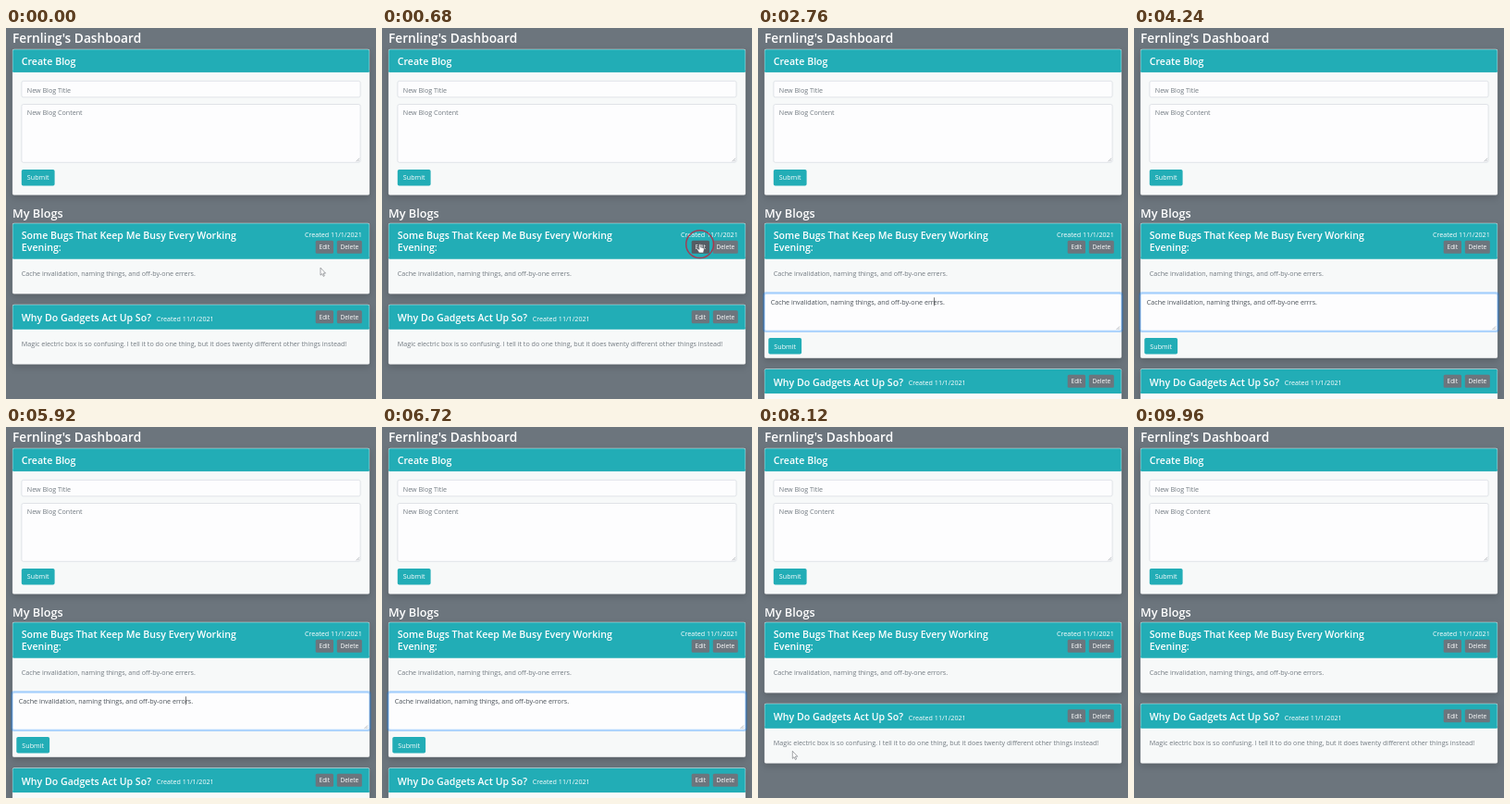
Recreate the animation shown at these times as an HTML page. Size 400 by 401 pixels, loop 10000 ms.

```html
<!DOCTYPE html>
<html lang="en">
<head>
<meta charset="utf-8">
<title>Blog dashboard</title>
<style>
  html, body { margin: 0; height: 100%; overflow: hidden; background: #6c757d; }
  svg { display: block; width: 100vw; height: 100vh; }
  text { font: 7.15px "Open Sans", "Noto Sans", sans-serif; white-space: pre; }
  .h1, .h2, .h3 { font-weight: 600; fill: #fff; }
  .h1 { font-size: 13.7px; }
  .h2 { font-size: 12.7px; }
  .h3 { font-size: 10.6px; }
  .small { font-size: 6.5px; }
  .light { fill: #fff; }
  .muted { fill: #727a81; }
  .typed { fill: #495057; }
  .shadow { filter: drop-shadow(0 3.7px 3.7px rgba(0, 0, 0, .17)); }
</style>
</head>
<body>
<svg id="stage" viewBox="0 0 400 401"></svg>
<script>
const LOOP = 10000;
const TEAL = '#22adb6', GREY = '#6c757d', DARK = '#555c63';
const stage = document.getElementById('stage');
const pen = document.createElement('canvas').getContext('2d');

// Times of the interface events, in ms
const OPEN = 760, FOCUS = 2240, ERASE = 3600, TYPE = 4840, BLUR = 7520, SAVE = 7880;
const BLINK = 530;
const BEFORE = 'Cache invalidation, naming things, and off-by-one err';
const sentence = letter => BEFORE + letter + 'rs.';

// Pointer stops: time, x, y of the hot spot
const trips = [
  [[0, 340, 259.2], [200, 340, 259.2], [560, 343.8, 233.5], [1260, 343.8, 233.5], [1480, 285, 291]],
  [[7300, 78, 328], [7440, 37.3, 350.3], [8480, 37.3, 350.3], [8880, 44, 402]],
];
const clicks = [[600, 343.6, 233.7], [2200, 191, 296], [7480, 37.5, 351]];

const text = (x, y, str, cls, extra = '') =>
  `<text x="${x}" y="${y}" class="${cls}" ${extra}>${str}</text>`;

const box = (x, y, w, h, fill, extra = '') =>
  `<rect x="${x}" y="${y}" width="${w}" height="${h}" fill="${fill}" ${extra}/>`;

// Bordered panel with a teal header
const card = (y, h, head) =>
  box(6.9, y, 386.2, h, '#d9dadb', 'rx="1.9" class="shadow"') +
  box(7.3, y + .4, 385.4, h - .8, '#f7f9f9', 'rx="1.5"') +
  box(7.3, y + .4, 385.4, head - .4, TEAL, 'rx="1.5"') +
  box(7.3, y + head - 2, 385.4, 2, TEAL);

const grip = (x, y) =>
  `<path d="M${x - 4.5} ${y - 1}l3.5 -3.5M${x - 2.5} ${y - 1}l1.5 -1.5" stroke="#8b9095" stroke-width=".6"/>`;

const field = (x, y, w, h, focused) =>
  (focused ? box(x - 1, y - 1, w + 2, h + 2, 'none', 'rx="2.4" stroke="#007bff" stroke-opacity=".3" stroke-width="1.8"') : '') +
  box(x, y, w, h, '#fdfdfe', `rx="1.8" stroke="${focused ? '#80bdff' : '#ced4da'}" stroke-width=".6"`);

const submit = (x, y, fill = TEAL, glow = false) =>
  (glow ? box(x - .8, y - .8, 37.4, 19.2, 'none', 'rx="2.4" stroke="#6fc7cd" stroke-width="1.6"') : '') +
  box(x, y, 35.8, 17.6, fill, 'rx="1.8"') +
  text(x + 17.9, y + 11.5, 'Submit', 'light', 'text-anchor="middle"');

const actions = (y, editFill = GREY) =>
  box(334.7, y, 19.3, 14, editFill, 'rx="1.5"') + text(344.3, y + 9.3, 'Edit', 'light small', 'text-anchor="middle"') +
  box(357.8, y, 27, 14, GREY, 'rx="1.5"') + text(371.3, y + 9.3, 'Delete', 'light small', 'text-anchor="middle"');

function pointerAt(t) {
  for (const stops of trips) {
    for (let i = 1; i < stops.length; i++) {
      const [t0, x0, y0] = stops[i - 1], [t1, x1, y1] = stops[i];
      if (t < t0 || t >= t1) continue;
      const p = (t - t0) / (t1 - t0), k = p * p * (3 - 2 * p);
      return [x0 + (x1 - x0) * k, y0 + (y1 - y0) * k];
    }
  }
  return null;
}

function pointer(x, y, hand) {
  const shape = hand
    ? 'M-.9 .8Q0 -.6 .9 .8V3.6L3.6 4.2Q4.6 4.6 4.4 6L3.6 9.4H-.9L-3 6.2Q-3.3 4.8-2.2 5L-.9 6Z'
    : 'M0 0V8L1.8 6.4L3.1 9.2L4.3 8.6L3.1 5.9H5.5Z';
  return `<path transform="translate(${x} ${y})" d="${shape}" fill="#fff" stroke="#4a4f54" stroke-width=".5" stroke-linejoin="round"/>`;
}

const rings = t => clicks.map(([start, x, y]) => {
  const p = (t - start) / 250;
  return p < 0 || p > 1 ? '' :
    `<circle cx="${x}" cy="${y}" r="${11 + 12 * p}" fill="none" stroke="#b32f48" stroke-width="1.5" opacity="${Math.min(1, 1.3 * (1 - p))}"/>`;
}).join('');

function caret(t) {
  const since = t - (t >= TYPE ? TYPE : t >= ERASE ? ERASE : FOCUS);
  if (Math.floor(since / BLINK) % 2) return '';
  pen.font = '71.5px "Open Sans", "Noto Sans", sans-serif';
  const x = 13.8 + pen.measureText(BEFORE + (t >= TYPE ? 'o' : '')).width / 10;
  return box(x, 291.3, .6, 9, '#222');
}

function editor(t) {
  const focused = t >= FOCUS && t < BLUR;
  const letter = t >= TYPE ? 'o' : t >= ERASE ? '' : 'e';
  return field(7.2, 287.2, 385.6, 40, focused) + grip(392, 327) +
    text(13.8, 298.5, sentence(letter), 'typed') +
    (focused ? caret(t) : '') +
    submit(11.3, 335, t >= 7400 ? '#1b858d' : TEAL, t >= BLUR);
}

function scene(t) {
  const open = t >= OPEN && t < SAVE;
  const at = pointerAt(t);
  const overEdit = at && at[0] > 335 && at[1] > 230 && at[1] < 244;
  const overSubmit = open && at && at[0] < 47 && at[1] > 335;
  const editFill = overEdit || (t >= 640 && t < FOCUS) ? DARK : GREY;
  return box(0, 0, 400, 401, GREY) +
    text(7, 15.7, "Fernling's Dashboard", 'h1') +
    card(22.8, 157.8, 24.9) + text(16.8, 39.7, 'Create Blog', 'h3') +
    field(16.9, 57.3, 366.2, 17.5) + text(22.8, 69.5, 'New Blog Title', 'muted') +
    field(16.9, 82.5, 366.2, 62.8) + text(22.8, 94.4, 'New Blog Content', 'muted') + grip(383, 145.3) +
    submit(16.8, 152.9) +
    text(7, 205.2, 'My Blogs', 'h2') +
    card(210.8, open ? 146 : 76.7, 38.7) +
    text(16.8, 228.3, 'Some Bugs That Keep Me Busy Every Working', 'h3') +
    text(16.8, 241.4, 'Evening:', 'h3') +
    text(384.8, 226.1, 'Created 11/1/2021', 'light', 'text-anchor="end"') +
    actions(229.8, editFill) +
    text(16.8, 267.5, sentence(t >= SAVE ? 'o' : 'e'), 'muted') +
    (open ? editor(t) : '') +
    `<g transform="translate(0 ${open ? 69.5 : 0})">` +
    card(298.8, 64.8, 26.8) +
    text(16.8, 317.2, 'Why Do Gadgets Act Up So?', 'h3') +
    text(162.8, 316.7, 'Created 11/1/2021', 'light') +
    actions(305.3) +
    text(16.8, 343.6, 'Magic electric box is so confusing. I tell it to do one thing, but it does twenty different other things instead!', 'muted') +
    '</g>' +
    rings(t) +
    (at ? pointer(...at, overEdit || overSubmit) : '');
}

const start = performance.now();
function frame() {
  stage.innerHTML = scene((performance.now() - start) % LOOP);
  requestAnimationFrame(frame);
}
frame();
</script>
</body>
</html>
```
